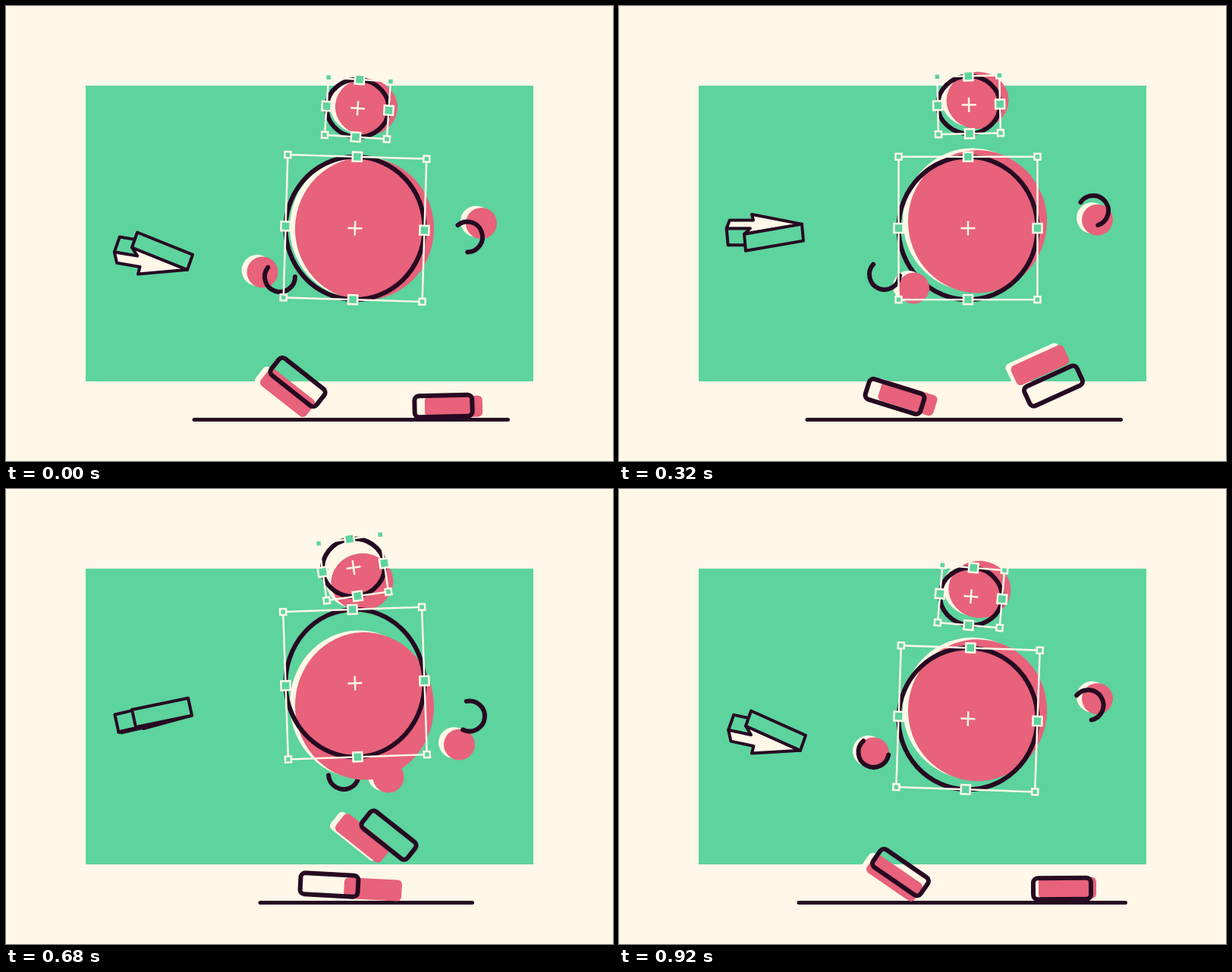
Recreate the animation shown at these times as an HTML page. Size 800 px wide and 600 px high, loop 960 ms.

```html
<!DOCTYPE html>
<html lang="en">
<head>
<meta charset="utf-8">
<title>Walking shapes</title>
<style>
  html, body { margin: 0; width: 100%; height: 100%; overflow: hidden; background: #fff7e7; }
  svg { display: block; width: 800px; height: 600px; }
  .cream { fill: #fff7e7; }
  .pink { fill: #e7627a; }
  .green { fill: #5dd39e; }
  .ink { fill: none; stroke: #260a22; stroke-width: 6; stroke-linecap: round; }
  .frame { fill: none; stroke: #fff7e7; stroke-width: 2.5; }
  .handle { fill: #5dd39e; stroke: #fff7e7; stroke-width: 2.5; }
  .block { stroke: #260a22; stroke-width: 4; stroke-linejoin: round; }
</style>
</head>
<body>
<svg id="stage" viewBox="0 0 800 600"></svg>
<script>
const LOOP = 960, STEP = 480, TICK = 40;
const SHADE = [-7, -2.5];
const stage = document.getElementById('stage');

function set(el, attrs) {
  for (const k in attrs) el.setAttribute(k, attrs[k]);
  return el;
}
function make(tag, cls, attrs, parent = stage) {
  const el = document.createElementNS('http://www.w3.org/2000/svg', tag);
  if (cls) el.setAttribute('class', cls);
  parent.appendChild(el);
  return set(el, attrs);
}
function place(el, x, y, angle = 0) {
  el.setAttribute('transform',
    `translate(${x.toFixed(2)} ${y.toFixed(2)}) rotate(${angle.toFixed(2)})`);
}
const wave = (t, peak, k = 1) => Math.cos(2 * Math.PI * k * (t - peak) / STEP);

// Smooth periodic curve through rows of [time, ...values]
function curve(rows) {
  const n = rows.length;
  const at = i => rows[(i + n) % n];
  const time = i => at(i)[0] + Math.floor(i / n) * LOOP;
  const slope = (i, c) => {
    const h0 = time(i) - time(i - 1), h1 = time(i + 1) - time(i);
    const d0 = (at(i)[c] - at(i - 1)[c]) / h0, d1 = (at(i + 1)[c] - at(i)[c]) / h1;
    return (d0 * h1 + d1 * h0) / (h0 + h1);
  };
  return t => {
    let i = n - 1;
    while (rows[i][0] > t) i--;
    const h = time(i + 1) - time(i), u = (t - time(i)) / h, v = 1 - u;
    return rows[0].slice(1).map((_, k) => {
      const c = k + 1;
      return at(i)[c] * v * v * (1 + 2 * u) + at(i + 1)[c] * u * u * (1 + 2 * v)
        + h * u * v * (v * slope(i, c) - u * slope(i + 1, c));
    });
  };
}

// time, outline x, y, angle, fill x, y
const handPath = curve([
  [0, 608, 304.5, -20, 626.5, 286.5],
  [120, 527.5, 365.5, 30, 577, 349.5],
  [200, 445, 376, 67, 504, 380],
  [280, 375.5, 362.5, 100, 422.5, 380.5],
  [320, 350, 354, 113, 388.5, 372],
  [440, 335.5, 347, 119, 335.5, 348],
  [480, 361, 357, 109, 338, 351],
  [540, 459, 371, 88, 395, 368],
  [600, 563, 348, 60, 481, 374.5],
  [680, 611, 299.5, 7, 597.5, 337],
  [760, 623, 274.5, -29, 627.5, 293.5],
  [800, 625, 270, -37, 630.5, 282],
  [920, 618.5, 285, -31, 630.5, 276.5]
]);
const footPath = curve([
  [0, 576.5, 527.5, -1.2, 590, 528.3],
  [120, 507, 528.5, -2.2, 551.5, 528.7],
  [200, 426, 522, 3, 483.5, 527.8],
  [280, 374, 516, 12.5, 405.5, 519.5],
  [320, 363.5, 515, 17.3, 380.5, 517],
  [440, 371, 505.5, 34.5, 363, 513],
  [480, 384.5, 496, 38.3, 371, 510],
  [600, 446, 463.5, 49.3, 419.5, 480.5],
  [680, 504.5, 456.5, 38.5, 470, 460.5],
  [760, 557, 481.5, -13.3, 529.5, 459.5],
  [800, 572.5, 501, -24.5, 555, 473.5],
  [920, 584, 527, -0.4, 591, 526]
]);
// time, centre x, length x, depth x, depth y, height x, height y
const blockPath = curve([
  [0, 173.5, 69, 8, 35, -7, 20],
  [120, 171, 72, 10, 22, 2, 23.5],
  [320, 171, 71, 10, -26, 2, 22],
  [480, 171, 71.5, 9, -32, -3, 21],
  [680, 173.5, 69, 10, 2, 5, 23],
  [760, 171, 71, 10, 24, 2, 23],
  [920, 174.5, 68, 8, 36, -7, 20]
]);

// A part is a pink fill with a pale shade behind it; returns its mover
function fillPair(tag, attrs, parent) {
  const shade = make(tag, 'cream', attrs, parent);
  const face = make(tag, 'pink', attrs, parent);
  return {
    all: [shade, face],
    move(x, y, a) {
      place(shade, x + SHADE[0], y + SHADE[1], a);
      place(face, x, y, a);
    }
  };
}
function makeHand() {
  const fill = fillPair('circle', { r: 20.5 });
  const r = 20, half = 109 * Math.PI / 180;
  const x = r * Math.cos(half), y = r * Math.sin(half);
  const ring = make('path', 'ink', { d: `M${x} ${-y}A${r} ${r} 0 1 1 ${x} ${y}` });
  return t => {
    const [rx, ry, a, fx, fy] = handPath(t % LOOP);
    place(ring, rx, ry, a);
    fill.move(fx, fy);
  };
}
function makeFoot() {
  const box = { x: -38, y: -14, width: 76, height: 28, rx: 6 };
  const fill = fillPair('rect', box);
  const line = make('rect', 'ink', box);
  return t => {
    const [x, y, a, fx, fy] = footPath(t % LOOP);
    place(line, x, y, a);
    fill.move(fx, fy, a);
  };
}
function makeSelection(w) {
  const g = make('g');
  const frame = make('rect', 'frame', { x: -w / 2, width: w }, g);
  make('path', 'frame', { d: 'M-9.5 0H9.5M0 -9.5V9.5' }, g);
  const handles = [];
  for (const i of [-1, 0, 1]) for (const j of [-1, 0, 1]) {
    if (!i && !j) continue;
    const s = i && j ? 8 : 12;
    handles.push([make('rect', 'handle', { x: i * w / 2 - s / 2, width: s, height: s }, g), j, s]);
  }
  return (x, y, a, h) => {
    place(g, x, y, a);
    set(frame, { y: -h / 2, height: h });
    for (const [el, j, s] of handles) el.setAttribute('y', j * h / 2 - s / 2);
  };
}
function makeBlock() {
  const tail = make('polygon', 'green block');
  const face = make('polygon', 'cream block');
  const wall = make('polygon', 'green block');
  const outline = [[1, 0], [0, .5], [.07, .205], [-.37, .205], [-.37, -.205], [.07, -.205], [0, -.5]];
  return t => {
    const [cx, lx, dx, dy, hx, hy] = blockPath(t);
    const cy = 312 + 15.7 * wave(t, 36);
    const ly = -1 + 15.3 * wave(t, 436);
    const at = ([a, b], e) => [cx + a * lx + b * dx + e * hx, cy + a * ly + b * dy + e * hy]
      .map(v => v.toFixed(2)).join();
    const side = (p, q) => [at(p, -.5), at(q, -.5), at(q, .5), at(p, .5)].join(' ');
    const e = lx * dy - ly * dx > 0 ? .5 : -.5;
    set(tail, { points: side(outline[4], outline[5]) });
    set(face, { points: outline.map(p => at(p, e)).join(' ') });
    set(wall, { points: side(outline[6], outline[0]) });
  };
}

make('rect', 'green', { x: 105, y: 105, width: 590, height: 390 });
const ground = make('line', 'ink', { y1: 545.5, y2: 545.5, style: 'stroke-width:5' });
const farHand = makeHand();
const headFill = fillPair('ellipse', { rx: 41, ry: 37.7 });
const bodyFill = fillPair('ellipse', { rx: 91.5 });
const headRing = make('ellipse', 'ink', { rx: 41, ry: 38 });
const bodyRing = make('ellipse', 'ink', { rx: 91.5 });
const feet = [makeFoot(), makeFoot()];
const nearHand = makeHand();
const headBox = makeSelection(82);
const bodyBox = makeSelection(183);
const block = makeBlock();

function render(t) {
  const low = k => wave(t, 400, k);

  const x1 = 279.5 - 56.6 * low(1) + 13 * low(2) - 3.3 * low(3);
  set(ground, { x1, x2: 661.5 - .54 * (x1 - 248) });

  const bodyY = 279.5 + 27 * low(1);
  const bodyH = 190.7 - 4.5 * low(1);
  const bodyA = 2 * wave(t, 440);
  set(bodyRing, { ry: bodyH / 2 });
  for (const el of bodyFill.all) set(el, { ry: bodyH / 2 });
  place(bodyRing, 460, bodyY, bodyA);
  bodyFill.move(472.5, 289 + 5.5 * wave(t, 40), bodyA);
  bodyBox(460, bodyY, bodyA, bodyH);

  const s = 2 * Math.PI * (t - 440) / STEP;
  const headX = 461 + 3 * wave(t, 436);
  const headY = 123.5 + 19.05 * Math.cos(s) - 6 * Math.sin(s)
    - .85 * Math.cos(2 * s) - 2 * Math.sin(2 * s);
  const headA = -1.6 + 6.5 * wave(t, 436);
  place(headRing, headX, headY, headA);
  headFill.move(headX + 11.4, 127.5 + 5.8 * wave(t, 4), headA);
  headBox(headX, headY, headA, 76);

  nearHand(t);
  farHand(t + STEP);
  feet[0](t);
  feet[1](t + STEP);
  block(t);
}

function tick(now) {
  render(Math.floor(now / TICK) * TICK % LOOP);
  requestAnimationFrame(tick);
}
render(0);
requestAnimationFrame(tick);
</script>
</body>
</html>
```
